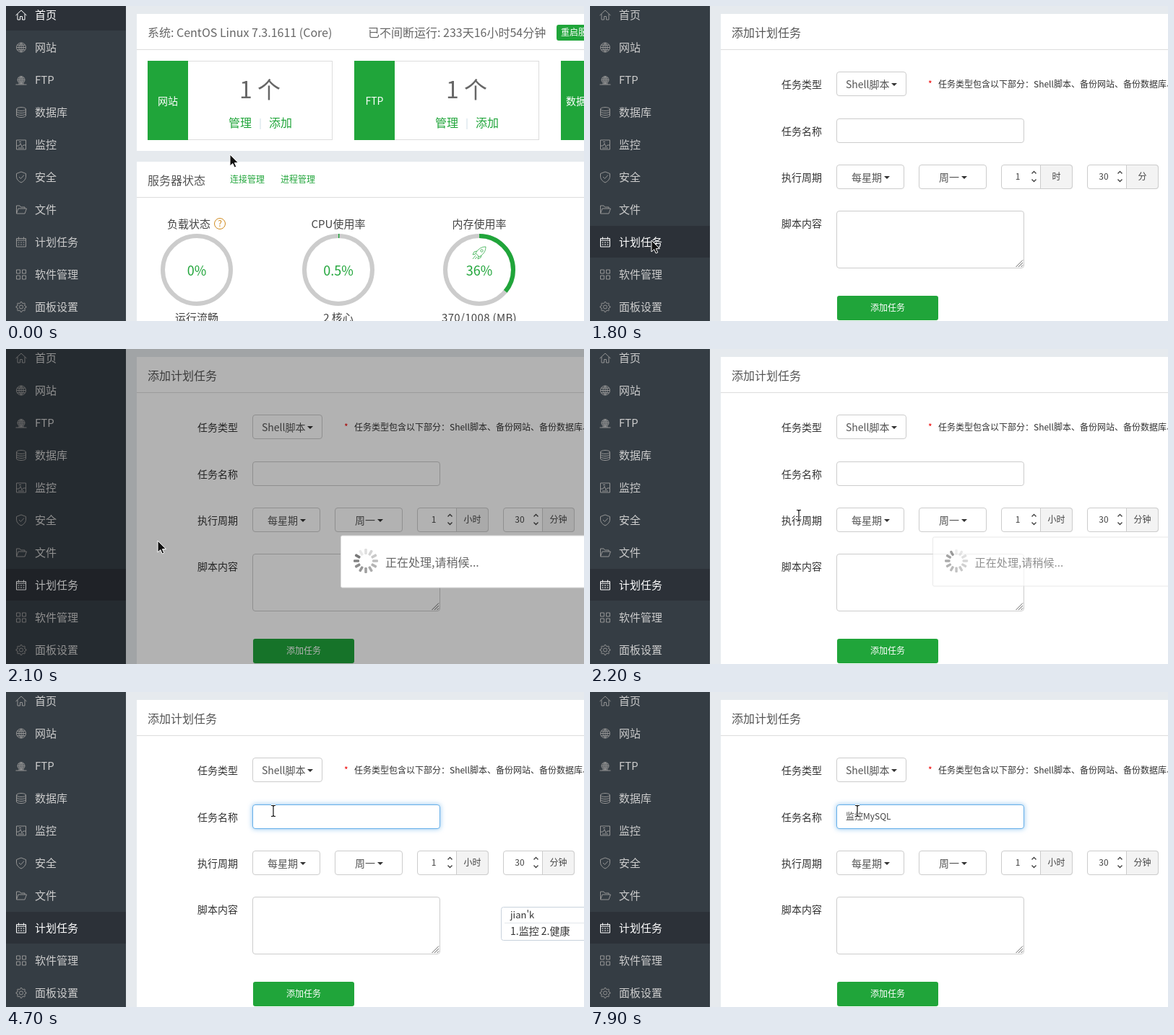
These frames come from a looping animation (800x437 px, 8 s). An HTML page:

```html
<!DOCTYPE html>
<html lang="zh-CN">
<head>
<meta charset="utf-8">
<title>添加计划任务</title>
<style>
html, body { margin: 0; width: 100%; height: 100%; overflow: hidden; }
svg { display: block; width: 800px; height: 437px; }
text { font-family: "Noto Sans CJK SC", "Noto Sans CJK", "Noto Sans", sans-serif; white-space: pre; }
.icon { fill: none; stroke-width: 1; }
</style>
</head>
<body>
<svg id="stage" viewBox="0 0 800 437"></svg>
<script>
const GREEN = '#20a53a', LOOP = 8000, STEP = 100;
const $ = id => document.getElementById(id);
const show = (id, on) => $(id).setAttribute('display', on ? 'inline' : 'none');
const set = (id, name, value) => $(id).setAttribute(name, value);

// Text placed by the vertical centre of its line
const text = (x, cy, size, fill, s, more = '') =>
  `<text x="${x}" y="${Math.round(cy + size * .37)}" font-size="${size}" fill="${fill}" ${more}>${s}</text>`;
const mid = (x, cy, size, fill, s, more = '') => text(x, cy, size, fill, s, 'text-anchor="middle" ' + more);
const rect = (x, y, w, h, fill, more = '') =>
  `<rect x="${x}" y="${y}" width="${w}" height="${h}" fill="${fill}" ${more}/>`;
const frame = (x, y, w, h, r = 3.5, stroke = '#ccc', fill = '#fff') =>
  rect(x + .5, y + .5, w - 1, h - 1, fill, `rx="${r}" stroke="${stroke}"`);
const path = (d, more = '') => `<path d="${d}" ${more}/>`;

// Sidebar: label and icon, drawn around the icon's centre
const globe = r => `M${-r} 0a${r} ${r} 0 1 0 ${2 * r} 0a${r} ${r} 0 1 0 ${-2 * r} 0H${r}` +
  `M0 ${-r}V${r}M0 ${-r}Q${-r} 0 0 ${r}Q${r} 0 0 ${-r}M${-r * .8} ${-r / 2}H${r * .8}M${-r * .8} ${r / 2}H${r * .8}`;
const gear = () => {
  let d = '';
  for (let i = 0; i < 32; i++) {
    const a = (i - .5) * Math.PI / 16, r = i % 4 < 2 ? 7 : 5.3;
    d += (i ? 'L' : 'M') + (r * Math.cos(a)).toFixed(2) + ' ' + (r * Math.sin(a)).toFixed(2);
  }
  return d + 'ZM-2.5 0a2.5 2.5 0 1 0 5 0a2.5 2.5 0 1 0 -5 0';
};
const menu = [
  ['首页', 'M-7.5 .5L0 -6.5L7.5 .5M-5 -1.5V6.5H-1.5V2H1.5V6.5H5V-1.5'],
  ['网站', globe(6.5)],
  ['FTP', globe(5) + 'M-4 5.5H4M-7.5 6.5H7.5'],
  ['数据库', 'M-6.5 -4.5a6.5 2.5 0 1 0 13 0a6.5 2.5 0 1 0 -13 0V4.5a6.5 2.5 0 0 0 13 0V-4.5' +
    'M-6.5 -1.5a6.5 2.5 0 0 0 13 0M-6.5 1.5a6.5 2.5 0 0 0 13 0'],
  ['监控', 'M-6.5 -6.5H6.5V6.5H-6.5ZM-6.5 1.5H-3L-1 -2L1 3L3 .5H6.5M-4 4.5H4M-3 -4H0'],
  ['安全', 'M0 -7.5L6.5 -5V0Q5.5 5 0 7.5Q-5.5 5 -6.5 0V-5ZM-3 -.5L-.5 2L4 -3'],
  ['文件', 'M-6.5 5.5V-5.5H-2L-.5 -3.5H5V-1.5M-6.5 5.5L-4 -1.5H7.5L5 5.5Z'],
  ['计划任务', 'M-6.5 -5H6.5V6.5H-6.5ZM-3.5 -7V-4M3.5 -7V-4M-6.5 -2.5H6.5M-4.5 .5H-2.5M-1 .5H1M2.5 .5H4.5M-4.5 3.5H-2.5M-1 3.5H1M2.5 3.5H4.5'],
  ['软件管理', 'M-6.5 -6.5h5v5h-5ZM1.5 -6.5h5v5h-5ZM-6.5 1.5h5v5h-5ZM1.5 1.5h5v5h-5Z'],
  ['面板设置', gear()]
];
const sidebar = () => rect(0, 0, 166, 437, '#353d44') +
  rect(0, -10, 166, 44, '#2c3138', 'id="row"') +
  menu.map(([label, d], i) => {
    const cy = 12 + 45 * i;
    return path(d, `id="icon${i}" class="icon" transform="translate(21 ${cy + .5})"`) +
      text(40, cy, 15, '#ccc', label, `id="item${i}"`);
  }).join('');

const card = (x, name) => frame(x, 76, 256, 110, 0, '#ddd') + rect(x, 76, 56, 110, GREEN) +
  mid(x + 28, 132, 14, '#fff', name) + mid(x + 155.5, 116, 32, '#666', '1 个') +
  text(x + 112, 162, 16, GREEN, '管理') + rect(x + 155.5, 156, 1, 15, '#cfe0e8') +
  text(x + 168, 162, 16, GREEN, '添加');

const gauge = (x, title, percent, foot, tx = x, more = '') =>
  mid(tx, 302, 15, '#444', title) +
  `<circle cx="${x}" cy="366" r="47" fill="none" stroke="#ccc" stroke-width="6"/>` +
  (percent ? `<circle cx="${x}" cy="366" r="47" fill="none" stroke="${GREEN}" stroke-width="6" pathLength="100"
    stroke-dasharray="${percent} 100" transform="rotate(-90 ${x} 366)"/>` : '') +
  mid(x, 367, 18, GREEN, percent + '%') + mid(x, 432, 15, '#444', foot, more);

const home = () => rect(181, 11, 619, 190, '#fff') + rect(181, 60, 619, 1, '#ddd') +
  text(196, 37, 16, '#666', '系统: CentOS Linux 7.3.1611 (Core)') +
  text(501, 37, 16, '#666', '已不间断运行: 233天16小时54分钟') +
  rect(762, 26, 80, 22, GREEN, 'rx="3"') + text(768, 37, 12, '#fff', '重启服务器') +
  card(196, '网站') + card(482, 'FTP') + card(768, '数据库') +
  rect(181, 216, 619, 221, '#fff') + rect(181, 265, 619, 1, '#ddd') +
  text(196, 242, 16, '#555', '服务器状态') +
  text(310, 241, 12, GREEN, '连接管理') + text(380, 241, 12, GREEN, '进程管理') +
  gauge(264, '负载状态', 0, '运行流畅', 253) +
  '<circle cx="296" cy="302" r="7.5" fill="none" stroke="#d08a1d"/>' + mid(296, 302, 12, '#d08a1d', '?') +
  gauge(460, 'CPU使用率', .5, '2 核心') +
  gauge(655, '内存使用率', 36, '370/1008 (MB)', 655, 'letter-spacing=".33"') +
  path('M664 334C657 334 653 338 650 343L655 348C660 345 664 341 664 334ZM652 340L648 341L646 345L650 344' +
    'M658 346L657 349L653 351L654 347M650 346L646 351M652 348L649 351', `fill="none" stroke="${GREEN}" opacity=".75"`) +
  `<circle cx="658.5" cy="339.5" r="1.7" fill="none" stroke="${GREEN}" opacity=".75"/>`;

const dropdown = (x, y, w, tx, label, ax) => frame(x, y, w, 34) + text(tx, y + 17.5, 14, '#555', label) +
  path(`M${ax} ${y + 16}h8l-4 4Z`, 'fill="#333"');
const spinner = (x, value, id) => frame(x, 220, 99, 34) +
  path(`M${x + 54.5} 220.5h40.5q3.5 0 3.5 3.5v26q0 3.5 -3.5 3.5h-40.5Z`, 'fill="#f3f3f3" stroke="#ccc"') +
  mid(x + 23, 237, 12, '#444', value) +
  path(`M${x + 42.5} 232.5l3 -3l3 3M${x + 42.5} 240.5l3 3l3 -3`, 'fill="none" stroke="#444" stroke-width="1.4"') +
  mid(x + 76.5, 237, 12, '#444', '', `id="${id}"`);

const form = () => rect(181, 11, 619, 426, '#fff') + rect(181, 60, 619, 1, '#ddd') +
  text(196, 37, 16, '#555', '添加计划任务') +
  ['任务类型', '任务名称', '执行周期', '脚本内容'].map((s, i) =>
    text(265, [109, 174, 238, 302][i], 14, '#333', s)).join('') +
  dropdown(341, 91, 97, 354, 'Shell脚本', 417) +
  text(468, 109, 12, '#e00', '*') +
  text(482, 109, 12, '#333', '任务类型包含以下部分：Shell脚本、备份网站、备份数据库、日志切割') +
  rect(341, 156, 260, 34, '#66afe9', 'id="glow" rx="4" filter="url(#blur)" opacity=".75"') +
  rect(341.5, 156.5, 259, 33, '#fff', 'id="input" rx="3.5"') +
  text(354, 173, 12, '#444', '', 'id="typed"') + rect(354, 164, 1, 18, '#222', 'id="caret"') +
  dropdown(341, 220, 94, 362, '每星期', 407) + dropdown(455, 220, 94, 483, '周一', 514) +
  spinner(569, '1', 'hour') + spinner(688, '30', 'minute') +
  frame(341, 284, 260, 80) +
  path('M589.5 362L599 352.5M593 362L599 356M596.5 362L599 359.5', 'stroke="#666"') +
  rect(342, 402, 140, 34, GREEN, 'rx="3"') + mid(412, 419, 12, '#fff', '添加任务');

const spokes = () => [...Array(12).keys()].map(i =>
  rect(-1.8, -17, 3.6, 8, '#444', `rx="1.2" opacity="${(.12 + i * .055).toFixed(2)}" transform="rotate(${i * 30})"`)).join('');
const notice = () => `<g id="notice">${frame(-200, -36.5, 400, 73, 2, '#ddd')}
  <g transform="translate(-165 -1)"><g id="wheel">${spokes()}</g></g>
  ${text(-138, 1, 16, '#666', '正在处理,请稍候...')}</g>`;

const ime = () => `<g id="ime">${frame(685, 298, 140, 47, 3, '#c8d2dc')}
  ${text(698, 309, 13, '#333', '', 'id="pinyin"')}${rect(690, 320, 110, 1, '#e3e8ec')}
  ${text(698, 332, 14, '#333', '', 'id="choice"')}</g>`;

const cursors = () => `<g id="cursor" stroke-linejoin="round">
  ${path('M0 0V16L3.8 12.6L6.2 18L8.8 16.9L6.4 11.6H11.4Z', 'id="arrow" fill="#111" stroke="#fff"')}
  ${path('M-1.5 10V.5Q0 -1.5 1.5 .5V6Q3 5 4 6.5Q5.5 5.5 6.5 7Q8.5 6.5 9 8.5V12Q8.5 14 7.5 16H-.5Q-2.5 13 -5 9.5Q-4.5 7 -1.5 10Z',
    'id="hand" fill="#111" stroke="#fff"')}
  <g id="beam" fill="none">${['#fff" stroke-width="3', '#111" stroke-width="1.2'].map(s =>
    path('M-3 -7.5H-1L0 -6.5L1 -7.5H3M0 -6.5V6.5M-3 7.5H-1L0 6.5L1 7.5H3', `stroke="${s}"`)).join('')}</g></g>`;

$('stage').innerHTML = '<defs><filter id="blur" x="-10%" y="-60%" width="120%" height="220%">' +
  '<feGaussianBlur stdDeviation="3.5"/></filter></defs>' +
  rect(0, 0, 800, 437, '#e6eaee') + sidebar() +
  `<g id="home">${home()}</g><g id="form">${form()}</g>` +
  rect(0, 0, 800, 437, '#000', 'id="shade" opacity=".3"') + notice() + ime() + cursors();

const clamp = v => Math.max(0, Math.min(1, v));
const smooth = v => v * v * (3 - 2 * v);
const mix = (a, b, k) => a + (b - a) * k;
const grey = v => { v = Math.round(v); return `rgb(${v},${v},${v})`; };
// The last entry whose start time has been reached
const at = (list, t) => list.reduce((now, e) => e[0] <= t ? e : now);
// Linear interpolation between [time, ...values]
const track = (keys, t) => {
  let i = 0;
  while (i < keys.length - 2 && t >= keys[i + 1][0]) i++;
  const [a, b] = [keys[i], keys[i + 1]];
  const k = clamp((t - a[0]) / (b[0] - a[0]));
  return a.slice(1).map((v, n) => mix(v, b[n + 1], k));
};

// start, text, caret x
const typing = [[0, '', 354], [5400, '监控', 378], [6000, '监控M', 388], [6100, '监控My', 394],
  [6900, '监控MyS', 401], [7000, '监控MySQ', 410], [7300, '监控MySQL', 417]];
const spelling = [[0, 'ji', '1.及 2.级 3.几'], [4200, 'jian', '1.见 2.间 3.件'],
  [4700, "jian'k", '1.监控 2.健康'], [4800, "jian'kong", '1.监控 2.见']];
const blinks = [[0, false], [3400, true], [4400, false], [5400, true], [6700, false], [6900, true], [7900, false]];
const pointer = [[1900, 85, 325], [2000, 130, 302], [2100, 210, 266], [2200, 289, 231], [2300, 345, 185], [2400, 370, 165]];
// time, scale, opacity
const popup = [[1900, .5, .3], [2000, .85, .8], [2100, 1, 1], [2200, .945, .72], [2300, .82, .25], [2400, .7, 0]];

function draw(time) {
  const t = Math.floor(time / STEP) * STEP;
  const onForm = t >= 1700, focus = t >= 3400;
  show('home', !onForm);
  show('form', onForm);

  const hover = clamp((t - 800) / 700);
  menu.forEach((_, i) => {
    const lit = i === (onForm ? 7 : 0) ? 1 : i === 7 ? hover : 0;
    set('icon' + i, 'stroke', grey(mix(148, 255, lit)));
    set('item' + i, 'fill', grey(mix(204, 255, lit)));
  });
  set('row', 'y', onForm ? 305 : -10);

  $('hour').textContent = t < 1900 ? '时' : '小时';
  $('minute').textContent = t < 1900 ? '分' : '分钟';
  show('glow', focus);
  set('input', 'stroke', focus ? '#66afe9' : '#ccc');
  const [, typed, caretX] = at(typing, t);
  $('typed').textContent = typed;
  set('caret', 'x', caretX);
  show('caret', at(blinks, t)[1]);

  show('shade', t >= 1900 && t < 2200);
  show('notice', t >= 1900 && t < 2400);
  const [scale, alpha] = track(popup, t);
  set('notice', 'transform', `translate(663 295) scale(${scale})`);
  set('notice', 'opacity', alpha);
  set('wheel', 'transform', `rotate(${(t - 2200) / 100 * 30})`);

  show('ime', t >= 4100 && t < 5400);
  const [, pinyin, choice] = at(spelling, t);
  $('pinyin').textContent = pinyin;
  $('choice').textContent = choice;

  const k = smooth(clamp((t - 300) / 900));
  const [x, y] = onForm ? track(pointer, t) : [mix(310, 85, k), mix(206, 324, k)];
  const shape = !onForm && x < 166 ? 'hand' : t >= 2200 ? 'beam' : 'arrow';
  ['arrow', 'hand', 'beam'].forEach(s => show(s, s === shape));
  set('cursor', 'transform', `translate(${Math.round(x)} ${Math.round(y)})`);
}

const start = performance.now();
function tick() {
  draw((performance.now() - start) % LOOP);
  requestAnimationFrame(tick);
}
tick();
</script>
</body>
</html>
```
